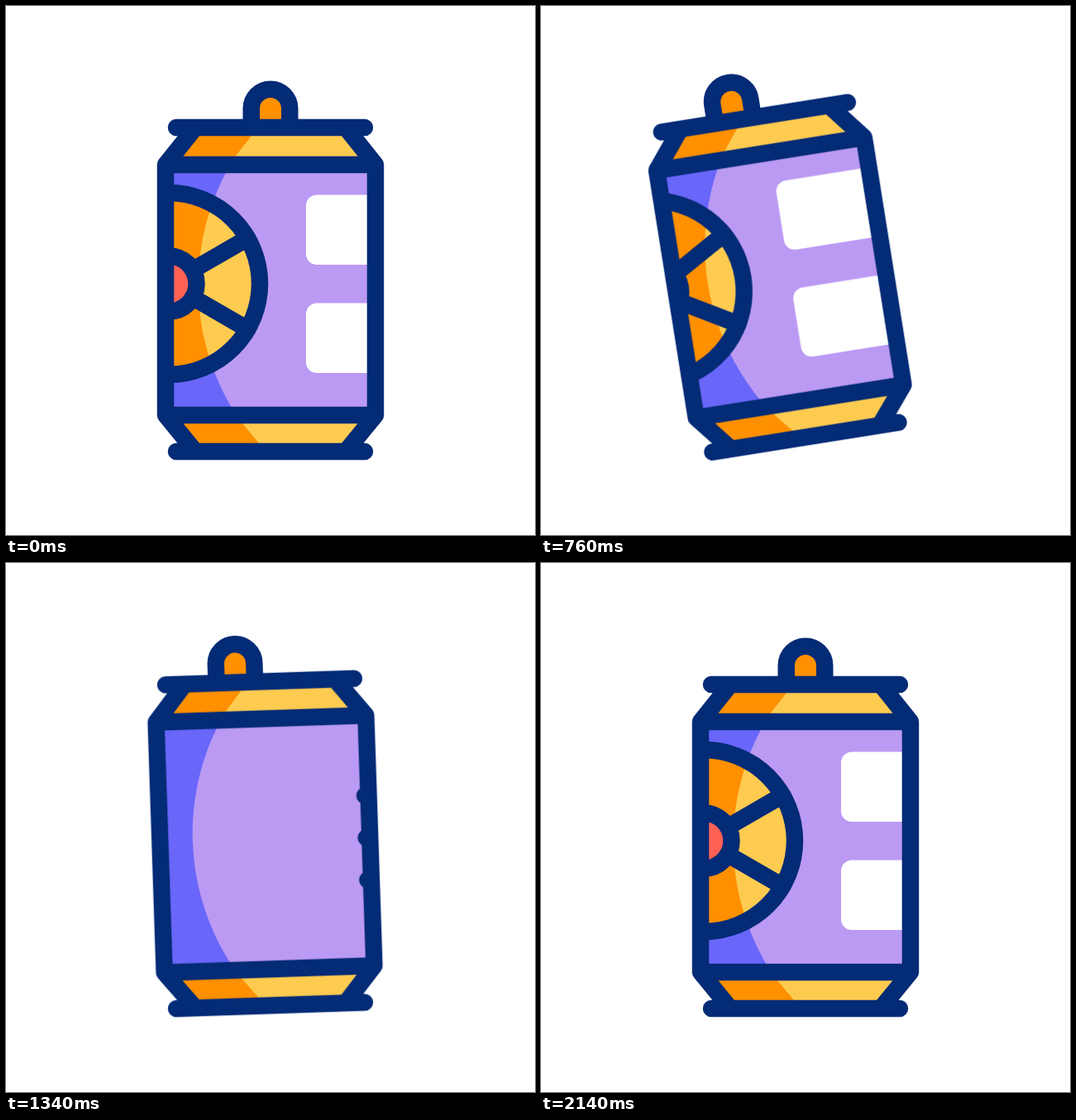
An HTML page that plays this animation: 640x640 px, repeating every 2400 ms.

```html
<!DOCTYPE html>
<html lang="en">
<head>
<meta charset="utf-8">
<title>Spinning can</title>
<style>
  html, body { margin: 0; width: 100%; height: 100%; overflow: hidden; background: #fff; }
  svg { display: block; width: 100vw; height: 100vh; }
  .line { fill: none; stroke: #042b76; stroke-width: 20.5; stroke-linecap: round; stroke-linejoin: round; }
  .swoosh { fill: none; stroke: #67cbd1; stroke-width: 20.5; stroke-linecap: round; }
  .yellow { fill: #fdcb50; }
  .orange { fill: #ff9000; }
</style>
</head>
<body>
<svg viewBox="0 0 640 640">
  <defs>
    <clipPath id="body"><rect x="193" y="192" width="254" height="303"/></clipPath>
    <clipPath id="fruit"><circle cx="197" cy="336" r="110"/></clipPath>
    <path id="shade" d="M150 150H600V45A292.5 292.5 0 0 0 525 630H150Z"/>
    <mask id="dark">
      <rect width="640" height="640" fill="#fff"/>
      <circle cx="525" cy="337.5" r="292.5" fill="#000"/>
    </mask>
    <g id="fruitFill"><circle cx="197" cy="336" r="110"/></g>
    <g id="print">
      <g fill="#fff">
        <rect x="363" y="228.500" width="150" height="84.500" rx="13"/>
        <rect x="363" y="359.500" width="150" height="84.500" rx="13"/>
      </g>
      <path class="line" d="M-339 289h140M-339 340h140M-339 391h140"/>
      <circle cx="197" cy="336" r="33.500" fill="#ff6155"/>
      <g class="line">
        <circle cx="197" cy="336" r="110"/>
        <circle cx="197" cy="336" r="33.500"/>
        <path d="M226 319.300L292.300 281M226 352.700L292.300 391M168 319.300L101.700 281M168 352.700L101.700 391"/>
      </g>
    </g>
  </defs>
  <g id="can">
    <path id="back" class="swoosh"/>
    <g id="tab">
      <path class="orange" d="M296.750 147V124a23.250 23.250 0 0 1 46.500 0V147Z"/>
      <path class="line" d="M296.750 147V124a23.250 23.250 0 0 1 46.500 0V147"/>
    </g>
    <path class="yellow" d="M229 147H411L447 192H193ZM193 495H447L411 539H229Z"/>
    <path class="orange" d="M229 147H305L269.500 192H193ZM193 495H277.700L314.300 539H229Z"/>
    <g clip-path="url(#body)">
      <rect x="193" y="192" width="254" height="303" fill="#6966fa"/>
      <circle cx="525" cy="337.500" r="292.500" fill="#bb9af3"/>
      <g class="yellow"><use class="copy" href="#fruitFill"/><use class="copy" href="#fruitFill"/></g>
      <g class="orange" mask="url(#dark)"><use class="copy" href="#fruitFill"/><use class="copy" href="#fruitFill"/></g>
      <use class="copy" href="#print"/><use class="copy" href="#print"/>
    </g>
    <path class="line" d="M193 192H447V495H193ZM193 192L229 147M447 192L411 147M193 495L229 539M447 495L411 539M206 147H434M206 539H434"/>
    <path id="front" class="swoosh"/>
  </g>
</svg>
<script>
const LOOP = 2400;
const WRAP = 1100;
const $ = id => document.getElementById(id);
const can = $('can'), tab = $('tab'), back = $('back'), front = $('front');
const copies = [...document.querySelectorAll('.copy')];

// Keys are [time, value, slope]; a missing slope means the part rests there.
const tilt = [[200, 0], [380, -3.27, -0.032], [750, -9.1], [1090, 8.3], [1433, -4.1], [1783, 2.1], [2140, 0]];
const tabShift = [[200, 0], [380, -9.4, -0.088], [750, -25], [1090, 47.6], [1433, -45.7], [1860, 0]];
const printShift = [[200, 0], [380, -11, -0.112], [750, -32], [1000, 225, 1.55],
  [1340, 780, 1.35], [1600, 1033.5, 0.5], [1900, WRAP]];

function at(keys, t) {
  if (t <= keys[0][0]) return keys[0][1];
  const i = keys.findIndex(k => k[0] > t);
  if (i < 0) return keys[keys.length - 1][1];
  const [t0, a, m0 = 0] = keys[i - 1], [t1, b, m1 = 0] = keys[i];
  const d = t1 - t0, x = (t - t0) / d, y = 1 - x;
  return a + (b - a) * x * x * (3 - 2 * x) + d * x * y * (m0 * y - m1 * x);
}

const sweep = (t, start, end) => 270 - 360 * Math.min(1, Math.max(0, (t - start) / (end - start)));

function point(deg) {
  const r = deg * Math.PI / 180;
  return (320 + 194 * Math.cos(r)).toFixed(2) + ' ' + (343 + 49 * Math.sin(r)).toFixed(2);
}

// Part of the ring between two angles, limited to the range low..high.
function arc(from, to, low, high) {
  const a = Math.min(from, high), b = Math.max(to, low);
  return a - b > 0.01 ? `M${point(a)}A194 49 0 0 0 ${point(b)}` : '';
}

function render(t) {
  const angle = at(tilt, t);
  const lift = 110 * Math.abs(Math.sin(angle * Math.PI / 180));
  can.setAttribute('transform', `translate(0 ${-lift}) rotate(${angle} 320 539)`);
  tab.setAttribute('transform', `translate(${at(tabShift, t)} 0)`);

  const shift = at(printShift, t);
  copies.forEach((copy, i) => copy.setAttribute('x', shift - (i % 2) * WRAP));

  const head = sweep(t, 760, 1106), tail = sweep(t, 944, 1285);
  front.setAttribute('d', arc(tail, head, -25, 215));
  back.setAttribute('d', arc(tail, head, 215, 270) + arc(tail, head, -90, -25));
}

const begin = performance.now();
function tick() {
  render((performance.now() - begin) % LOOP);
  requestAnimationFrame(tick);
}
render(0);
requestAnimationFrame(tick);
</script>
</body>
</html>
```
